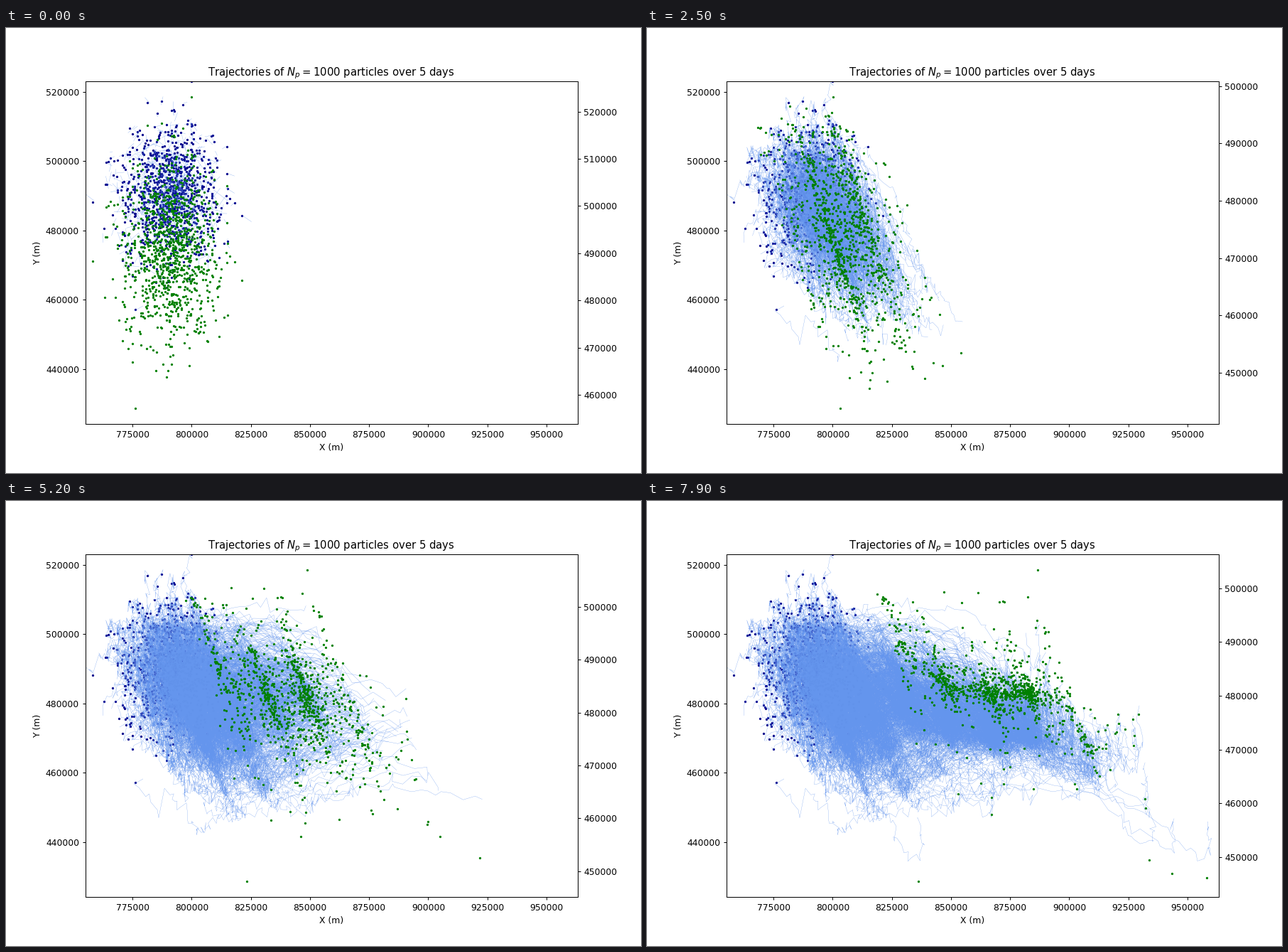
Recreate the animation shown at these times as a matplotlib script. Size 894 by 626 pixels, loop 8 s.

```python
import numpy as np
import matplotlib.pyplot as plt
from matplotlib.animation import FuncAnimation
from matplotlib.collections import LineCollection

W, H, DPI = 894, 626, 89.4
FRAMES, STEP = 80, 100
N = 1000
LEFT, RIGHT, TOP, BOTTOM = 0.125 * W, 0.9 * W, 0.12 * H, 0.89 * H
XLIM = (755100, 963100)
YLIM = (424060, 523070)
M_PER_PX = (XLIM[1] - XLIM[0]) / (RIGHT - LEFT)
CENTRE, SPREAD = np.array([790500, 490000]), 10000

rng = np.random.default_rng(5)
clock = np.arange(FRAMES) * STEP / 1000


def smooth(x):
    x = np.clip(x, 0, 1)
    return x * x * (3 - 2 * x)


def glide(times, values):
    """Cubic Hermite curve through a few key values, one value per frame."""
    times, values = np.array(times), np.array(values)
    slope = np.gradient(values, times)
    slope[-1] *= 0.5
    k = np.clip(np.searchsorted(times, clock, 'right') - 1, 0, len(times) - 2)
    h = times[k + 1] - times[k]
    s = (clock - times[k]) / h
    return (values[k] + (values[k + 1] - values[k]) * smooth(s)
            + h * s * (1 - s) * ((1 - s) * slope[k] - s * slope[k + 1]))


# Release cloud; four outermost particles set its extent
rim = np.array([(-3.23, -.18), (3.08, -.58), (-1.43, -3.29), (.94, 3.31)])
cloud = rng.normal(size=(2 * N, 2))
cloud = cloud[np.hypot(*cloud.T) < 2.9][:N - len(rim)]
unit = np.vstack([rim, cloud])
start = CENTRE + SPREAD * unit
u, v = unit.T

# The tide lifts and lowers the cloud while it drifts east
times = (0, 1.6, 2.5, 4.0, 5.2, 6.8, 7.9)
middle = glide(times, (490.1, 471.6, 464.7, 469.9, 471.9, 459.8, 470.4))
half = glide(times, (33.0, 34.8, 33.4, 38.6, 35.1, 31.4, 33.0))
drift = glide(times, (229.7, 268, 276, 318, 400, 495, 495))


def front(a):
    """Height of the stretched cloud along its length a: a hook, then a wave."""
    hook = 0.75 * np.exp(-np.maximum(a + 0.97, 0) * 4.9)
    trough = -0.33 * np.exp(-((a - 0.78) / 0.2) ** 2)
    fall = -0.5 * (1 + np.tanh((a - 1.18) * 20))
    return hook + trough + fall


def positions(f):
    t = clock[f]
    shear = 1 - np.exp(-t)
    squeeze = smooth((t - 3.5) / 3.3)

    east = np.maximum(u, 0) ** 3
    patch = (SPREAD / M_PER_PX + 2 * t) * u + 0.6 * t * east - 15 * shear * v
    band = np.where(u < 0, 175 * np.tanh(0.55 * u), 60 * u + 3.5 * east)
    x = (1 - squeeze) * patch + squeeze * band

    y = 0.303 * v + 0.3 * shear - 0.05 * shear * u * np.abs(u)
    thin = 0.3 + 0.05 * v + 0.03 * v ** 3 + front(band / 170)
    y = (1 - squeeze) * y + squeeze * thin
    y = np.interp(y, [y.min(), -0.8, 0.8, y.max()], [-1, -0.8, 0.8, 1])

    # gather the cloud into slanting filaments
    x = x + drift[f]
    x = x - 6 * shear * np.sin((x + 88 * y) / 9)
    return np.c_[XLIM[0] + (x - LEFT) * M_PER_PX,
                 1000 * (middle[f] + half[f] * y)]


track = np.array([positions(f) for f in range(FRAMES)])

# Turbulence makes the trails jagged
trail = track + rng.normal(size=track.shape) * (700, 1100)
lead = start + rng.normal(size=(N, 2)) * (2500, 1700)
trail = np.concatenate([lead[None], trail]).transpose(1, 0, 2)

# the small excess keeps the pixel size from rounding down
fig, ax = plt.subplots(figsize=((W + .01) / DPI, (H + .01) / DPI), dpi=DPI)
ax.set(xlim=XLIM, ylim=YLIM, xlabel='X (m)', ylabel='Y (m)')
ax.set_title(r'Trajectories of $N_p = 1000$ particles over 5 days')
twin = ax.twinx()

dot = dict(marker='o', ls='', ms=2.65, mew=0)
ax.plot(*start.T, color='darkblue', zorder=1, **dot)
lines = LineCollection([], colors='cornflowerblue', linewidths=0.22, zorder=2)
ax.add_collection(lines, autolim=False)
now, = twin.plot([], [], color='green', **dot)


def update(f):
    lines.set_segments(trail[:, :f + 2])
    x, y = track[f].T
    now.set_data(x, y)
    margin = 0.05 * np.ptp(y)
    twin.set_ylim(y.min() - margin, y.max() + margin)
    return lines, now


anim = FuncAnimation(fig, update, frames=FRAMES, interval=STEP,
                     repeat=True, repeat_delay=0, blit=False)
plt.show()
```
